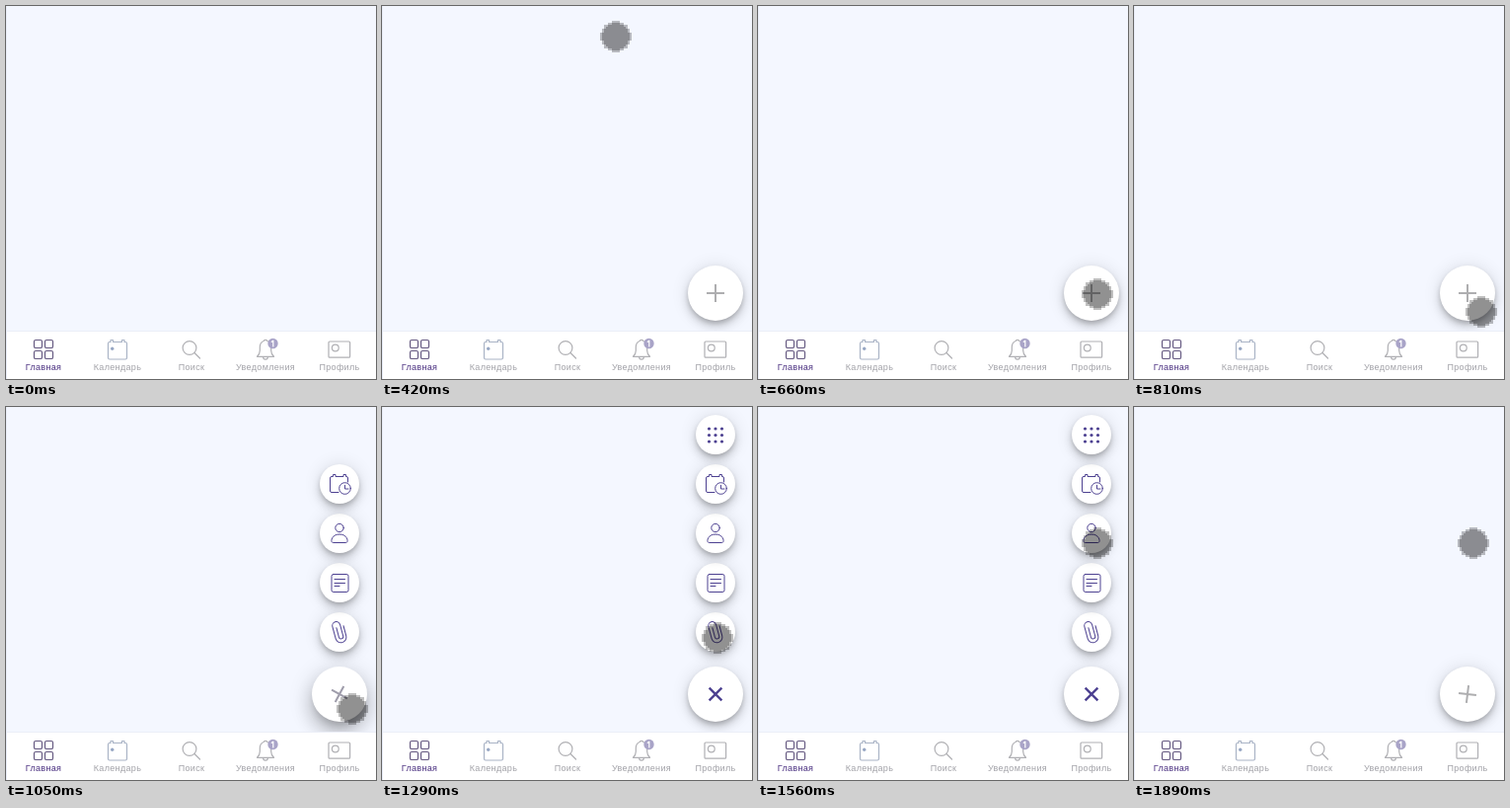
These frames come from a looping animation (375x378 px, 1920 ms). An HTML page:

```html
<!DOCTYPE html>
<html lang="ru">
<head>
<meta charset="utf-8">
<style>
html, body { margin: 0; width: 100%; height: 100%; overflow: hidden; }
#stage { position: relative; width: 375px; height: 378px; overflow: hidden; background: #f4f7ff; }
#stage::before { content: ""; position: absolute; left: 0; top: 0; width: 1px; height: 378px; background: #ebeffa; }
svg { position: absolute; left: 0; top: 0; overflow: visible; fill: none; stroke-linecap: round; stroke-linejoin: round; }
.fab {
  position: absolute; border-radius: 50%; background: #fff;
  box-shadow: 0 3px 5px -1px rgba(0,0,0,.2), 0 6px 10px rgba(0,0,0,.14), 0 1px 18px rgba(0,0,0,.12);
}
.fab.pressed { box-shadow: 0 7px 8px -4px rgba(0,0,0,.2), 0 12px 17px 2px rgba(0,0,0,.14), 0 5px 22px 4px rgba(0,0,0,.12); }
.fab svg { left: 50%; top: 50%; width: 1px; height: 1px; stroke: #4d4191; }
.small { left: 317.5px; width: 40px; height: 40px; }
#main { left: 309.5px; top: 263px; width: 56px; height: 56px; }
#main svg { stroke-width: 2; stroke-linecap: butt; }
#nav { position: absolute; left: 1px; top: 330px; width: 374px; height: 48px; background: #fff; box-shadow: 0 -1px 0 #ebeef7; }
#nav svg { left: -1px; top: -330px; stroke: #b0b0b4; stroke-width: 1.2; }
#nav text { font: 9px "Liberation Sans", Arial, sans-serif; letter-spacing: .33px; text-anchor: middle; fill: #a2a2a8; stroke: none; }
#nav .on { fill: #4a3080; }
</style>
</head>
<body>
<div id="stage">
  <div id="menu"></div>
  <div class="fab" id="main"><svg><path id="plus" d="M-9 0H9M0-9V9"/></svg></div>
  <div id="nav">
    <svg width="375" height="378">
      <g id="tiles" stroke="#665a82"></g>
      <path stroke="#aab4c6" d="M106 340.5h-1q-1.5 0-1.5 1.5v14.5q0 1.5 1.5 1.5h16q1.5 0 1.5-1.5V342q0-1.5-1.5-1.5h-1v-2h-2.5v2h-9v-2H106z"/>
      <circle cx="107.7" cy="347.3" r="1.7" fill="#98a8c4" stroke="none"/>
      <circle cx="186" cy="346.5" r="6.9"/>
      <path d="M191 351.5l5.5 5.5"/>
      <path d="M254.5 355.3q2.8-2.6 2.8-6v-3.5q0-5 4-6.3 0-1.2 1.7-1.2t1.7 1.2q4 1.3 4 6.3v3.5q0 3.4 2.8 6zM260.6 355.5q0 2.7 2.4 2.7t2.4-2.7"/>
      <circle cx="270.5" cy="342" r="5.2" fill="#a9a4c8" stroke="none"/>
      <path stroke="#fff" d="M269.3 340.3l1.5-1.2v5.8"/>
      <rect x="327" y="340" width="21.6" height="16.2" rx="1"/>
      <circle cx="333.8" cy="346.5" r="3.4"/>
      <g id="labels"></g>
    </svg>
  </div>
  <svg width="375" height="378"><g id="cursor"><path id="rim" fill="rgba(0,0,0,.25)"/><path id="core" fill="rgba(0,0,0,.43)"/></g></svg>
</div>
<script>
const LOOP = 1920, STEP = 30;
const $ = id => document.getElementById(id);
const grid = (vals, cell) => vals.map(y => vals.map(x => cell(x, y)).join("")).join("");

$("tiles").innerHTML = grid([0, 11], (x, y) =>
  `<rect x="${28.5 + x}" y="${338.5 + y}" width="8" height="8" rx="1.6"/>`);
$("labels").innerHTML = ["Главная", "Календарь", "Поиск", "Уведомления", "Профиль"].map((name, i) =>
  `<text class="${i ? "" : "on"}" x="${38 + 75 * i}" y="369">${name}</text>`).join("");

// Menu icons, bottom to top
const items = [
  '<path transform="rotate(-15)" d="M5.5-5V5.5a5.5 5.5 0 0 1-11 0V-7a4 4 0 0 1 8 0V5a2.2 2.2 0 0 1-4.4 0V-5"/>',
  '<rect x="-8" y="-8.5" width="17" height="18" rx="1.8"/><path d="M-5-3.5H5.5M-5 .5H5.5M-5 3.5H0"/>',
  '<circle cy="-5.5" r="4.2"/><path d="M-7 9.5C-9.5 9.5-8.5 1 0 1S9.5 9.5 7 9.5z"/>',
  '<path d="M-1 8.5H-8q-1.5 0-1.5-1.5V-6q0-1.5 1.5-1.5h1.5v-2H-4v2H4v-2H6.5v2H7q1.5 0 1.5 1.5v4"/><circle cx="5.5" cy="4.5" r="5.8"/><path d="M5.5 1.3V5H9"/>',
  grid([-6.5, 0, 6.5], (x, y) => `<circle cx="${x}" cy="${y + .5}" r="1.6" fill="#4d4191" stroke="none"/>`)
].map((icon, i) => {
  const el = document.createElement("div");
  el.className = "fab small";
  el.style.top = 208 - 50 * i + "px";
  el.innerHTML = `<svg>${icon}</svg>`;
  $("menu").append(el);
  return el;
});

// Blocky pointer disc on a 2px grid
const cells = Array.from({ length: 16 }, (_, i) => 2 * i - 16);
const ring = (min, max) => grid(cells, (x, y) => {
  const d = Math.hypot(x + 1, y + 1);
  return d >= min && d < max ? `M${x} ${y}h2v2h-2z` : "";
});
$("core").setAttribute("d", ring(0, 13.6));
$("rim").setAttribute("d", ring(13.6, 15.8));

const part = (t, start, length) => Math.min(1, Math.max(0, (t - start) / length));
const easeOut = (p, power) => 1 - (1 - p) ** power;
const smooth = p => p * p * (3 - 2 * p);
const mix = (a, b, p) => a + (b - a) * p;
const show = (el, on) => { el.style.visibility = on ? "visible" : "hidden"; };

// Fast approach to the button, then a bowed climb along the menu
function pointer(t) {
  const come = easeOut(part(t, 420, 390), 2.85);
  const climb = smooth(part(t, 960, 600) ** 1.3);
  return [
    mix(237, 352, come) - 8 * climb - 8.5 * Math.sin(Math.PI * climb),
    mix(31, 310, come) - 172 * climb
  ];
}

function draw(now) {
  const t = Math.floor(now % LOOP / STEP) * STEP;
  show($("main"), t >= 30);
  $("main").classList.toggle("pressed", t >= 990 && t < 1110);
  items.forEach((el, i) => show(el, t >= 990 + 20 * i && t < 1880 - 20 * i));

  show($("cursor"), t >= 420);
  $("cursor").setAttribute("transform", `translate(${pointer(t).map(Math.round)})`);

  const turn = easeOut(part(t, 970, 180), 1.7) - easeOut(part(t, 1770, 180), 1.7);
  const tint = [174, 174, 176].map((c, i) => Math.round(mix(c, [77, 65, 145][i], turn ** 4)));
  $("plus").setAttribute("transform", `rotate(${45 * turn})`);
  $("plus").setAttribute("stroke", `rgb(${tint})`);
  $("plus").setAttribute("stroke-width", mix(2, 2.4, turn ** 4));
}

const start = performance.now();
function tick() {
  draw(performance.now() - start);
  requestAnimationFrame(tick);
}
tick();
</script>
</body>
</html>
```
